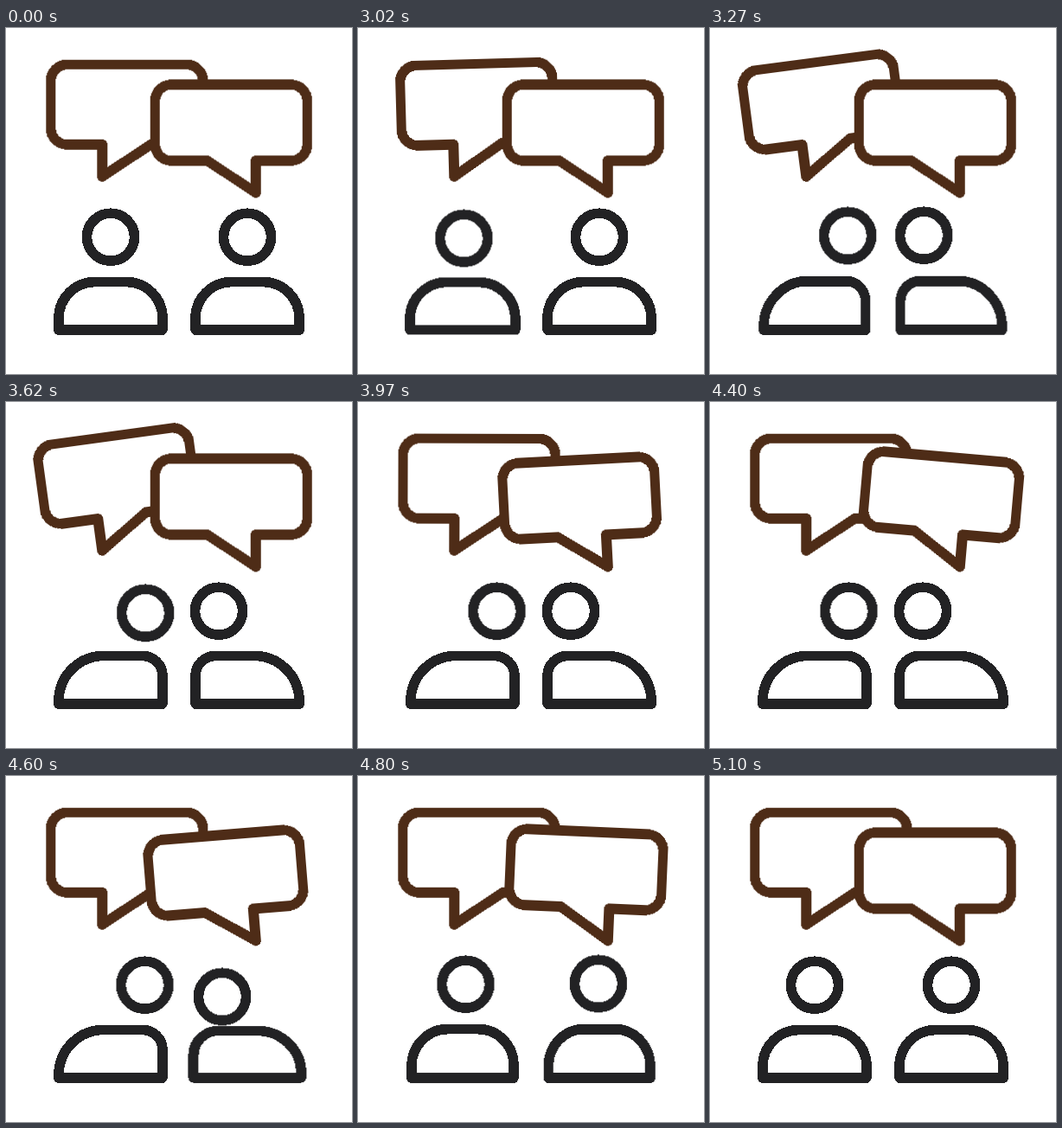
An HTML page that plays this animation: 400x400 px, repeating every 5.12 s.

```html
<!DOCTYPE html>
<html lang="en">
<head>
<meta charset="utf-8">
<title>Conversation</title>
<style>
  html, body { margin: 0; width: 100%; height: 100%; overflow: hidden; background: #fff; }
  svg { display: block; width: 100vw; height: 100vh; shape-rendering: crispEdges; }
  path, circle { fill: #fff; stroke-width: 11.6; stroke-linejoin: round; stroke-linecap: round; }
  .bubble { stroke: #4e2c17; transform-origin: 0 0; }
  .person { stroke: #222224; }
  .body { transform-origin: 121px 349px; }
</style>
</head>
<body>
<svg viewBox="0 0 400 400">
  <g transform="translate(111.3 171.7)"><path class="bubble" id="bubbleL"/></g>
  <g transform="translate(288.8 190.4) scale(-1 1)"><path class="bubble" id="bubbleR"/></g>
  <g class="person">
    <path class="body" id="bodyL"/>
    <circle id="headL" cx="121" cy="241.7" r="27.5"/>
  </g>
  <g class="person" transform="translate(400 0) scale(-1 1)">
    <path class="body" id="bodyR"/>
    <circle id="headR" cx="121" cy="241.7" r="27.5"/>
  </g>
</svg>
<script>
const LOOP = 5120;
const START = 3020;
const SWING = 'cubic-bezier(.37, 0, .63, 1)';
const el = id => document.getElementById(id);

// keys: [ms, value] pairs; the first and last values are held to the loop's ends
function play(id, prop, keys) {
  const all = [[0, keys[0][1]], ...keys, [LOOP, keys[keys.length - 1][1]]];
  el(id).animate(
    all.map(([ms, value]) => ({ offset: ms / LOOP, [prop]: value, easing: SWING })),
    { duration: LOOP, iterations: Infinity });
}

// Speech bubble with the tip of its tail at the origin
function bubblePath(top) {
  const r = 19, left = -59.5, right = 116.5, low = -37;
  const arc = (x, y) => `A${r} ${r} 0 0 1 ${x} ${y}`;
  return `M0 0V${low}H${left + r}${arc(left, low - r)}V${top + r}${arc(left + r, top)}` +
    `H${right - r}${arc(right, top + r)}V${low - r}${arc(right - r, low)}H56Z`;
}

// Shoulders with back radius a and front radius b
function bodyPath(a, b) {
  const top = 293.5;
  return `M61 349V${top + a}A${a} ${a} 0 0 1 ${61 + a} ${top}` +
    `H${181 - b}A${b} ${b} 0 0 1 181 ${top + b}V349Z`;
}

const rot = deg => `rotate(${deg}deg)`;
const move = (x, y) => `translate(${x}px, ${y}px)`;
const squash = (x, y) => `scale(${x}, ${y})`;

// Damped swing; sign is -1 inside the mirrored group
function swing(id, start, sign, lead) {
  const steps = [[200, -20.5], [400, 15], [580, -9.2], [820, 3.2], [1010, 0]];
  play(id, 'transform', [
    ...lead.map(([ms, deg]) => [ms, rot(deg * sign)]),
    ...steps.map(([ms, deg]) => [start + ms, rot(deg * sign)])
  ]);
}

const headTurn = (t, from, to) => {
  const at = k => from + (to - from) * k;
  return [[t + 100, move(at(.14), 15.5)], [t + 208, move(at(.96), -2)], [t + 460, move(to, 0)]];
};
const bodyTurn = t => [
  [t + 100, squash(1.042, .98)], [t + 215, squash(.978, 1.02)], [t + 460, squash(1, 1)]
];

const rest = bodyPath(42, 42);
const turned = bodyPath(52, 23);

function person(side, go, back, dx, lead, nods) {
  const still = squash(1, 1);
  play('head' + side, 'transform', [
    ...lead.map(([ms, x, y]) => [ms, move(x, y)]),
    ...headTurn(go, 0, dx),
    ...nods.map(([ms, x, y]) => [ms, move(dx + x, y)]),
    [back, move(dx, 0)],
    ...headTurn(back, dx, 0)
  ]);
  play('body' + side, 'transform', [
    ...lead.map(([ms, , , s]) => [ms, squash(s, 1.5 - s / 2)]),
    ...bodyTurn(go), [back, still], ...bodyTurn(back)
  ]);
  play('body' + side, 'd', [
    [Math.max(go, START), `path("${rest}")`], [go + 215, `path("${turned}")`],
    [back, `path("${turned}")`], [back + 215, `path("${rest}")`]
  ]);
  el('body' + side).setAttribute('d', rest);
}

el('bubbleL').setAttribute('d', bubblePath(-129.5));
el('bubbleR').setAttribute('d', bubblePath(-125));

swing('bubbleL', 2988, 1, [[START, 0], [START, -1.6]]);
swing('bubbleR', 3921, -1, [[3921, 0]]);

person('L', 2992, 4610, 39.5,
  [[START, 0, 0, 1], [START, 1.4, 1.4, 1.014]],
  [[3550, 0, 0], [3770, 3, 9.5], [3985, 0, 0], [4195, 3, 9.5], [4400, 0, 0]]);
person('R', 3042, 4525, 33, [[3042, 0, 0, 1]], []);
</script>
</body>
</html>
```
